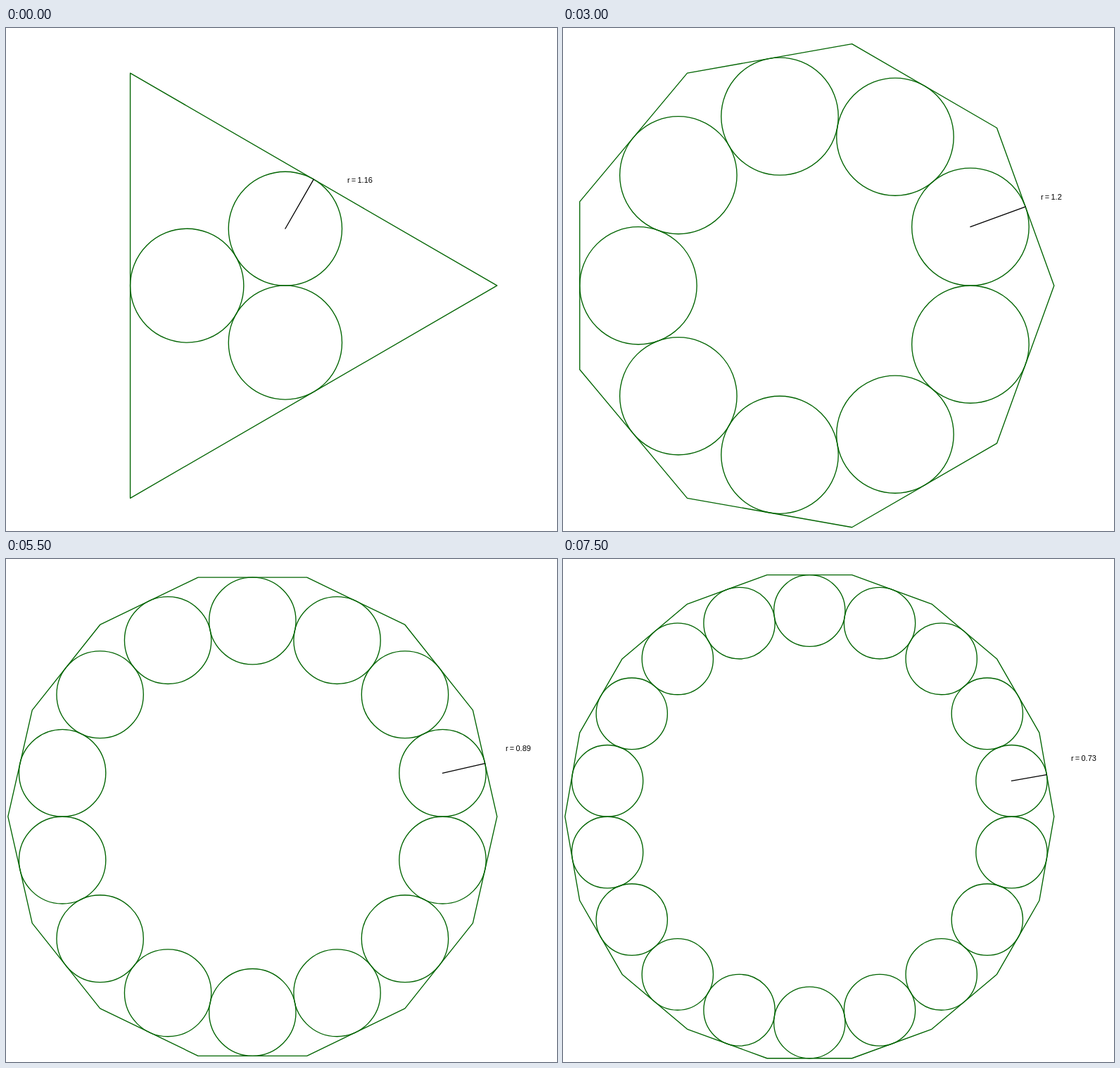
An HTML page for the animation above (8 s loop, 783 px wide and 715 px high).

```html
<!DOCTYPE html>
<html lang="en">
<head>
<meta charset="utf-8">
<title>Circles in a polygon</title>
<style>
  html, body { margin: 0; width: 100%; height: 100%; overflow: hidden; background: #fff; }
  svg { display: block; }
  .shape { fill: none; stroke: #006400; stroke-width: 1.35; stroke-linejoin: round; }
  .radius { stroke: #000; stroke-width: 1.3; stroke-linecap: round; }
  text { font: 11px "Liberation Sans", Arial, sans-serif; word-spacing: -0.85px; fill: #000; }
</style>
</head>
<body>
<svg width="783" height="715" viewBox="0 0 783 715">
  <polygon class="shape" id="outline"/>
  <g class="shape" id="circles"></g>
  <line class="radius" id="radius"/>
  <text id="label"></text>
</svg>
<script>
const SIZE = 5;                              // polygon circumradius in units
const UNIT = { x: 69.5, y: 69.77 };          // pixels per unit
const ORIGIN = { x: 350.3, y: 366.2 };
const STEP = 500, FIRST = 3, COUNT = 16;

const byId = id => document.getElementById(id);
const outline = byId('outline'), circles = byId('circles');
const radius = byId('radius'), label = byId('label');

const polar = (dist, angle) => ({
  x: ORIGIN.x + UNIT.x * dist * Math.cos(angle),
  y: ORIGIN.y - UNIT.y * dist * Math.sin(angle)
});

function set(el, attrs) {
  for (const key in attrs) el.setAttribute(key, attrs[key]);
}

function draw(n) {
  const half = Math.PI / n, sin = Math.sin(half), cos = Math.cos(half);
  const r = SIZE * cos * sin / (1 + sin);
  const dist = r / sin;
  const sides = [...Array(n).keys()];

  set(outline, {
    points: sides.map(k => polar(SIZE, 2 * k * half))
      .map(p => p.x.toFixed(2) + ',' + p.y.toFixed(2)).join(' ')
  });

  circles.replaceChildren(...sides.map(k => {
    const c = polar(dist, (2 * k + 1) * half);
    const ring = document.createElementNS('http://www.w3.org/2000/svg', 'ellipse');
    set(ring, { cx: c.x, cy: c.y, rx: r * UNIT.x, ry: r * UNIT.y });
    return ring;
  }));

  const from = polar(dist, half), to = polar(dist + r, half);
  set(radius, { x1: from.x, y1: from.y, x2: to.x, y2: to.y });

  // The label keeps a fixed offset from the middle of the radius, plus a push along its normal.
  set(label, {
    x: Math.round((from.x + to.x) / 2 + 57.1 + 12 * sin),
    y: Math.round((from.y + to.y) / 2 - 36 + 12 * cos)
  });
  label.textContent = 'r = ' + Number(r.toFixed(2));
}

let shown = 0;
const start = performance.now();

function tick() {
  const time = performance.now() - start;
  const n = FIRST + Math.floor(time / STEP) % COUNT;
  if (n !== shown) draw(shown = n);
  requestAnimationFrame(tick);
}
tick();
</script>
</body>
</html>
```
